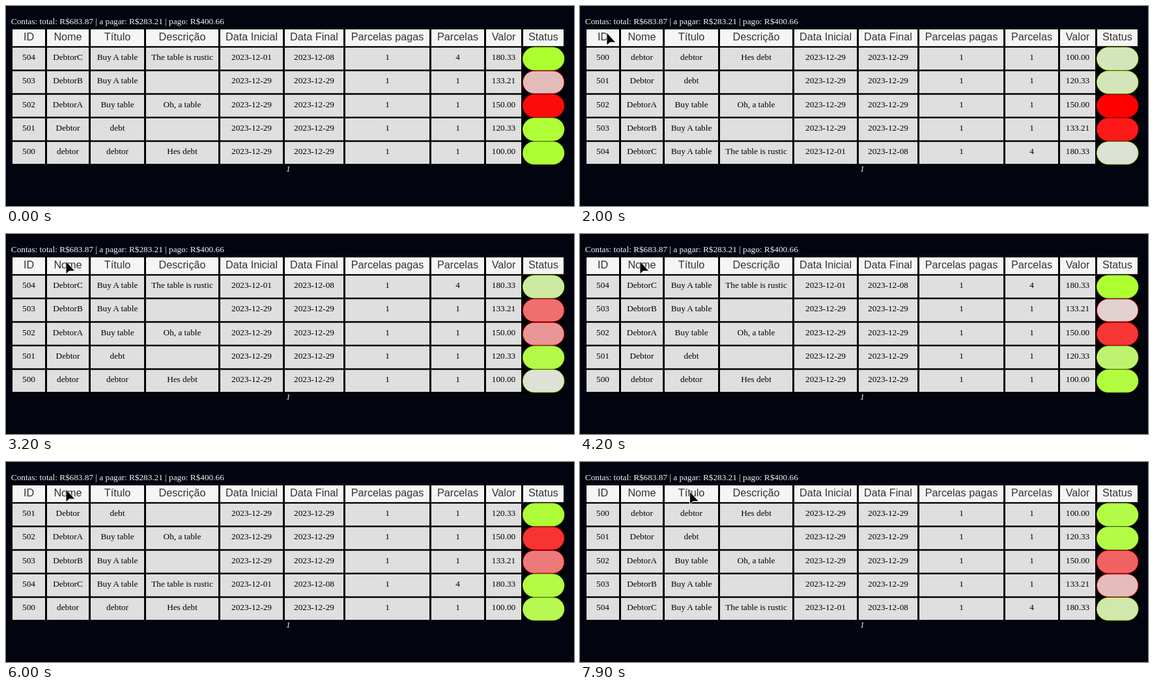
These frames come from a looping animation (872 px wide and 308 px high, 8 s). An HTML page:

```html
<!DOCTYPE html>
<html lang="pt">
<head>
<meta charset="utf-8">
<style>
  html, body { margin: 0; width: 872px; height: 308px; overflow: hidden; background: #02050f; }
  svg { display: block; }
  text { font: 13.26px "Liberation Serif", "Times New Roman", serif; fill: #000; }
  .mid { text-anchor: middle; }
  .head { font: 16.2px "Liberation Sans", Arial, sans-serif; fill: #333; }
  .light { fill: #f4f4f4; }
  .page { font-style: italic; }
</style>
</head>
<body>
<svg id="stage" width="872" height="308">
  <text class="light" x="7.8" y="28.4">Contas: total: R$683.87 | a pagar: R$283.21 | pago: R$400.66</text>
  <rect x="8" y="34" width="850" height="211"/>
  <text class="light mid page" x="433.3" y="255.4">1</text>
</svg>
<script>
const LOOP = 8000;
const stage = document.getElementById('stage');

// title, left edge, right edge
const columns = [
  ['ID', 10, 60], ['Nome', 63, 127], ['Título', 130, 212], ['Descrição', 215, 326],
  ['Data Inicial', 329, 425], ['Data Final', 428, 518], ['Parcelas pagas', 521, 650],
  ['Parcelas', 653, 734], ['Valor', 737, 791], ['Status', 794, 856]
];
const day = '2023-12-29';
const debts = [
  ['500', 'debtor', 'debtor', 'Hes debt', day, day, '1', '1', '100.00'],
  ['501', 'Debtor', 'debt', '', day, day, '1', '1', '120.33'],
  ['502', 'DebtorA', 'Buy table', 'Oh, a table', day, day, '1', '1', '150.00'],
  ['503', 'DebtorB', 'Buy A table', '', day, day, '1', '1', '133.21'],
  ['504', 'DebtorC', 'Buy A table', 'The table is rustic', '2023-12-01', '2023-12-08', '1', '4', '180.33']
];
const GREEN = [173, 255, 47], RED = [255, 0, 0], IDLE = [223, 223, 223];
const hues = [GREEN, GREEN, RED, RED, GREEN];
const periods = [600, 600, 680, 600, 600];

// Each sort rearranges the rows and restarts the pulses: phases in degrees at time `ref`.
// Reds run roughly opposite to greens.
const sorts = [
  { from: 0, ref: 0, order: [4, 3, 2, 1, 0], phases: [-20, -25, -26, 132, 8] },
  { from: 1500, ref: 2000, order: [0, 1, 2, 3, 4], phases: [124, 124, 0, -40, 154] },
  { from: 2400, ref: 3200, order: [4, 3, 2, 1, 0], phases: [154, 45, -111, -90, 107] },
  { from: 4800, ref: 5100, order: [0, 4, 3, 2, 1], phases: [160, 139, 0, -26, 147] },
  { from: 5900, ref: 6900, order: [1, 2, 3, 4, 0], phases: [127, 154, 58, 84, 139] },
  { from: 7600, ref: 7900, order: [0, 1, 2, 3, 4], phases: [43, 43, -84, -134, 113] }
];

// time, x, y of the pointer
const moves = [
  [350, 200, 266], [850, 50.5, 60.5], [1000, 50.5, 60.5], [1300, 41, 41], [2800, 41, 41],
  [3100, 92, 42], [6400, 92, 42], [6800, 123, 45], [7200, 123, 45], [7500, 168.5, 45.5]
];

function add(parent, tag, attrs, text = '') {
  const el = document.createElementNS('http://www.w3.org/2000/svg', tag);
  for (const key in attrs) el.setAttribute(key, attrs[key]);
  el.textContent = text;
  return parent.appendChild(el);
}

function addCell(parent, [, left, right], y, height, fill, text, baseline, cls) {
  add(parent, 'rect', { x: left, y, width: right - left, height, fill });
  add(parent, 'text', { x: (left + right) / 2, y: baseline, class: cls }, text);
}

columns.forEach(col => addCell(stage, col, 36, 25.8, '#f5f5f5', col[0], 52.7, 'head mid'));

const rows = debts.map((debt, i) => {
  const group = add(stage, 'g', {});
  debt.forEach((text, c) => addCell(group, columns[c], 0.3, 33.8, '#dfdfdf', text, 19.4, 'mid'));
  const pill = add(group, 'rect', {
    x: 793.5, y: 0, width: 63.4, height: 34.8, rx: 17.4, stroke: `rgb(${hues[i]})`, 'stroke-width': 0.8
  });
  return { group, pill };
});

const pointer = add(stage, 'path', {
  d: 'M0 0V19.5L5.3 15H13.8Z', fill: '#000', stroke: '#f4f4f4', 'stroke-width': 0.9, 'stroke-linejoin': 'round'
});

function pointerAt(t) {
  const next = moves.findIndex(m => m[0] > t);
  if (next < 0) return moves[moves.length - 1].slice(1);
  const [t0, x0, y0] = moves[next - 1], [t1, x1, y1] = moves[next];
  const u = (t - t0) / (t1 - t0), k = u * u * (3 - 2 * u);
  return [x0 + (x1 - x0) * k, y0 + (y1 - y0) * k];
}

function draw(t) {
  const sort = sorts.findLast(s => t >= s.from);
  sort.order.forEach((id, place) => {
    const { group, pill } = rows[id];
    group.setAttribute('transform', `translate(0 ${63.8 + 36.3 * place})`);
    const angle = (sort.phases[id] / 180 + 2 * (t - sort.ref) / periods[id]) * Math.PI;
    const level = 0.5 + 0.5 * Math.cos(angle);
    const mix = IDLE.map((v, c) => Math.round(v + (hues[id][c] - v) * level));
    pill.setAttribute('fill', `rgb(${mix})`);
  });
  const shown = t >= moves[0][0];
  pointer.setAttribute('visibility', shown ? 'visible' : 'hidden');
  if (shown) pointer.setAttribute('transform', `translate(${pointerAt(t)})`);
}

const start = performance.now();
function tick() {
  draw((performance.now() - start) % LOOP);
  requestAnimationFrame(tick);
}
tick();
</script>
</body>
</html>
```
